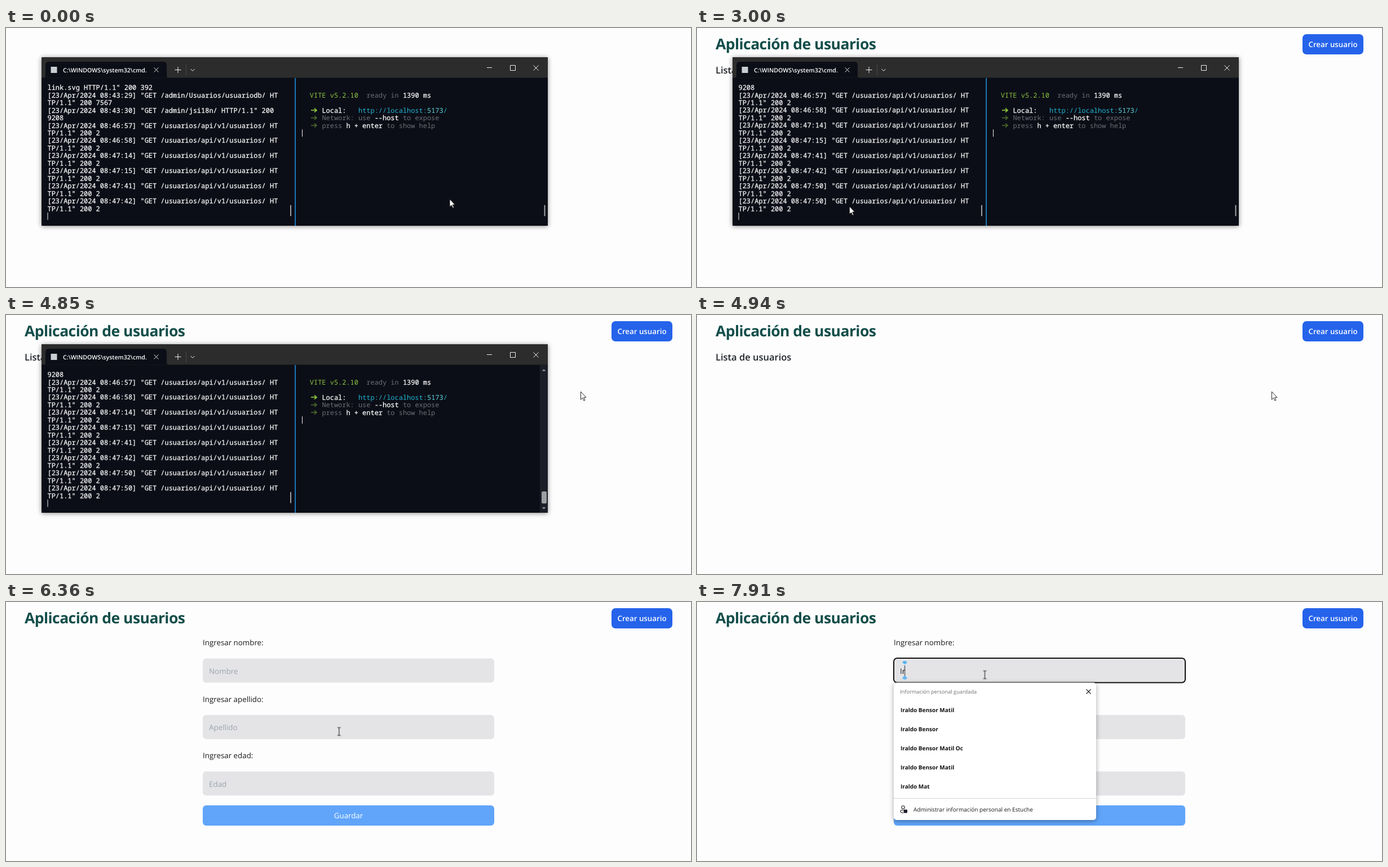
These frames come from a looping animation (1215 by 461 pixels, 8000 ms). An HTML page:

```html
<!DOCTYPE html>
<html lang="es">
<head>
<meta charset="utf-8">
<title>Aplicación de usuarios</title>
<style>
html, body { margin: 0; width: 100%; height: 100%; overflow: hidden; background: #fdfdfd; }
svg { display: block; width: 1215px; height: 461px; }
text { font-family: "Open Sans", "Noto Sans", sans-serif; white-space: pre; text-rendering: geometricPrecision; }
.mono text { font: 500 11.96px "Noto Sans Mono", "DejaVu Sans Mono", monospace; fill: #fff; stroke: #fff; stroke-width: .25px; }
.mono .dim { fill: #6c6f76; stroke: none; }
.mono .green { fill: #8bc53f; stroke: none; }
.mono .url { fill: #22b5d3; stroke: none; }
.mono .port { fill: #5fdbe3; stroke: none; }
.title { font-size: 26.5px; font-weight: 700; letter-spacing: -.54px; fill: #134e4a; }
.list { font-size: 16.5px; font-weight: 600; fill: #1f2328; }
.btn { font-size: 13.3px; font-weight: 600; fill: #fff; }
.label { font-size: 13.35px; fill: #1b1b1b; }
.hint { font-size: 13.4px; fill: #9ca3af; }
.field { fill: #e4e4e7; }
.line { fill: none; stroke: #f0f0f0; }
.names text { font-size: 10px; font-weight: 700; fill: #111; }
.shadow { filter: drop-shadow(0 1px 4px rgba(0, 0, 0, .45)); }
.popshadow { filter: drop-shadow(0 2px 4px rgba(0, 0, 0, .35)); }

/* hard switches, 1% = 80 ms */
.sw { animation: 8s step-end infinite; }
.page { animation-name: page; }
.win { animation-name: win; }
.list { animation-name: list; }
.form { animation-name: form; }
.bar { animation-name: bar; }
.thin { animation-name: thin; }
.focus { animation-name: focus; }
.empty { animation-name: empty; }
.typed { animation-name: typed; }
.second { animation-name: second; }
.caret { animation-name: caret; }
.popup { animation-name: popup; }
.log { animation-name: log; }
.new1 { animation-name: new1; }
.new2 { animation-name: new2; }
.arrow { animation-name: arrow; }
.beam { animation-name: beam; }
@keyframes page { 0% { opacity: 0 } 14%, to { opacity: 1 } }
@keyframes win { 0% { opacity: 1 } 61.75%, to { opacity: 0 } }
@keyframes list { 0% { opacity: 1 } 72.875%, to { opacity: 0 } }
@keyframes form { 0% { opacity: 0 } 72.875%, to { opacity: 1 } }
@keyframes bar { 0% { opacity: 0 } 52.875%, to { opacity: 1 } }
@keyframes thin { 0% { opacity: 1 } 52.875%, to { opacity: 0 } }
@keyframes focus { 0% { opacity: 0 } 86.75%, to { opacity: 1 } }
@keyframes empty { 0% { opacity: 1 } 94%, to { opacity: 0 } }
@keyframes typed { 0% { opacity: 0 } 94%, to { opacity: 1 } }
@keyframes second { 0% { fill: transparent } 97.75%, to { fill: #1b1b1b } }
@keyframes caret { 0% { transform: translateX(364px) } 97.75%, to { transform: translateX(368.5px) } }
@keyframes popup {
  0%, 93.25%, 96.75% { opacity: 0 }
  91.5%, 94.875%, 98.875%, to { opacity: 1 }
}
@keyframes log {
  0% { transform: none }
  18% { transform: translateY(-26.94px) }
  18.875% { transform: translateY(-40.41px) }
  19.75%, to { transform: translateY(-53.88px) }
}
@keyframes new1 { 0% { opacity: 0 } 18%, to { opacity: 1 } }
@keyframes new2 { 0% { opacity: 0 } 18.875%, to { opacity: 1 } }
@keyframes arrow { 0%, 81.875% { opacity: 1 } 74.5%, 84.375%, to { opacity: 0 } }
@keyframes beam { 0%, 81.875% { opacity: 0 } 74.5%, 84.375%, to { opacity: 1 } }

.pointer { animation: move 8s linear infinite; }
@keyframes move {
  0%, 5.5% { transform: translate(786.5px, 304px); animation-timing-function: ease-in-out }
  10.625%, 19.5% { transform: translate(687px, 231px); animation-timing-function: ease-in-out }
  24.75%, 31.875% { transform: translate(565px, 249px); animation-timing-function: ease-in }
  35.75% { transform: translate(330px, 328px) }
  37.5% { transform: translate(270px, 317px); animation-timing-function: ease-out }
  40.875%, 42.5% { transform: translate(249px, 310px) }
  44% { transform: translate(244px, 308px); animation-timing-function: ease-in-out }
  52.875%, 53.5% { transform: translate(956px, 190px); animation-timing-function: ease-out }
  60.625%, 63% { transform: translate(1019px, 136px); animation-timing-function: ease-in-out }
  68.75% { transform: translate(1100px, 31px); animation-timing-function: ease-out }
  71.25%, 74.49% { transform: translate(1104px, 42px) }
  74.5%, 76.25% { transform: translate(639px, 224px); animation-timing-function: ease-in }
  78.75% { transform: translate(600px, 240px) }
  81.875% { transform: translate(562px, 201px) }
  84.375% { transform: translate(530px, 144px); animation-timing-function: ease-out }
  86.25%, to { transform: translate(510.5px, 129.5px) }
}
</style>
</head>
<body>
<svg viewBox="0 0 1215 461">
  <defs>
    <clipPath id="pane"><rect x="63" y="100.5" width="448" height="251"/></clipPath>
    <clipPath id="tab"><rect x="95" y="60" width="154" height="28"/></clipPath>
  </defs>

  <g class="sw page">
    <text class="title" x="33" y="38">Aplicación de usuarios</text>
    <rect x="1074" y="11" width="108" height="36" rx="7" fill="#2563eb"/>
    <text class="btn" x="1128" y="34" text-anchor="middle">Crear usuario</text>
    <text class="sw list" x="33" y="80.5">Lista de usuarios</text>
  </g>

  <g class="sw form">
    <g id="fields"></g>
    <rect x="349" y="362" width="517" height="36" rx="6" fill="#60a5fa"/>
    <text class="btn" x="607.5" y="385" text-anchor="middle" style="font-weight:400">Guardar</text>
    <rect class="sw focus" x="349" y="100" width="517" height="43.5" rx="6" fill="none" stroke="#111" stroke-width="2"/>
    <g class="sw typed">
      <text class="label" x="360" y="127.5">I<tspan class="sw second">r</tspan></text>
      <g class="sw caret">
        <path d="M0 113V132" stroke="#111"/>
        <path d="M-4 108a4 3.2 0 0 1 8 0L0 111.5ZM-4 134.5a4 3.2 0 0 0 8 0L0 131Z" fill="#5cb6f2"/>
      </g>
    </g>
  </g>

  <g class="sw popup">
    <rect class="popshadow" x="349" y="143.5" width="359" height="244.5" rx="5" fill="#fff"/>
    <text x="360" y="163" font-size="9.25" fill="#707070">Información personal guardada</text>
    <path d="M690.5 155.5l8 8m0-8l-8 8" stroke="#222" stroke-width="1.1"/>
    <g class="names" id="names"></g>
    <path d="M349 349.5H708" stroke="#d4d4d4"/>
    <g fill="none" stroke="#222" stroke-width="1.1">
      <circle cx="365.5" cy="365.5" r="2.7"/>
      <path d="M366 375.5c-3 0-5-1-5-3.5q0-1.5 1.5-1.5H366"/>
    </g>
    <rect x="366.5" y="369.5" width="6.5" height="6" rx="1" fill="#1b1b2b"/>
    <text x="384" y="373" font-size="10.05" fill="#1b1b1b">Administrar información personal en Estuche</text>
  </g>

  <g class="sw win">
    <rect class="shadow" x="63" y="52" width="898" height="300" fill="#0c0e17"/>
    <path d="M63 52H961V88.5H63Z" fill="#2c2c2c"/>
    <path d="M66 88.5q4 0 4-4V66q0-6 6-6H279q6 0 6 6V84.5q0 4 4 4Z" fill="#0c0e17"/>
    <rect x="79.5" y="69" width="11" height="11" fill="#c9ced3"/>
    <g clip-path="url(#tab)">
      <text x="101" y="78.5" font-size="10.6" font-weight="600" fill="#fff">C:\WINDOWS\system32\cmd.exe</text>
    </g>
    <path class="line" d="M262.5 70.5l8 8m0-8l-8 8M299.5 74.5h11m-5.5-5.5v11M327.5 73l3.5 3.5 3.5-3.5M853 70.5h9M894.5 66.5h9v9h-9ZM935.5 66.5l9 9m0-9l-9 9"/>
    <path d="M319.5 65V84" stroke="#484848"/>
    <rect x="512.2" y="89" width="1.8" height="263" fill="#1f80c8"/>

    <g class="mono">
      <g clip-path="url(#pane)"><g class="sw log" id="log"></g></g>
      <g id="server"></g>
    </g>
    <path d="M74 328.5V341.5M525.5 180.5V193.5" stroke="#f0f0f0"/>
    <g fill="none" stroke-width="1.8" id="arrows"></g>
    <rect x="504" y="315" width="2" height="20" rx="1" fill="#a2a3a6"/>
    <rect class="sw thin" x="954.5" y="315" width="2" height="20" rx="1" fill="#a2a3a6"/>
    <g class="sw bar">
      <rect x="947" y="89" width="14" height="263" fill="#1b1e27"/>
      <rect x="950" y="314" width="9" height="21.5" rx="2" fill="#9d9ea2"/>
      <path d="M950.5 100h7l-3.5-4ZM950.5 342h7l-3.5 4Z" fill="#85878d"/>
    </g>
  </g>

  <g class="pointer">
    <path class="sw arrow" d="M.5.5V14.5L3.7 11.5 5.9 16.5 8 15.6 5.8 10.7H10Z" fill="#fff" stroke="#111" stroke-width=".9"/>
    <path class="sw beam" d="M-3-7h2q1 0 1 1V6q0 1-1 1h-2M3-7H1q-1 0-1 1M3 7H1Q0 7 0 6" fill="none" stroke="#222" stroke-width="1.1"/>
  </g>
</svg>
<script>
const $ = id => document.getElementById(id);
const ROW = 13.47, COL = 7.176, WIDTH = 57;
const baseline = row => 110.2 + row * ROW;

// server requests, wrapped at the pane width
const api = ['/usuarios/api/v1/usuarios/', 2];
const requests = [
  ['43:29', '/admin/Usuarios/usuariodb/', 7567],
  ['43:30', '/admin/jsi18n/', 9208],
  ...['46:57', '46:58', '47:14', '47:15', '47:41', '47:42', '47:50', '47:50'].map(t => [t, ...api])
];
const lines = ['link.svg HTTP/1.1" 200 392'];
for (const [time, path, size] of requests) {
  const entry = `[23/Apr/2024 08:${time}] "GET ${path} HTTP/1.1" 200 ${size}`;
  lines.push(entry.slice(0, WIDTH), entry.slice(WIDTH));
}
const freshness = i => i < 17 ? '' : i < 19 ? 'sw new1' : 'sw new2';
$('log').innerHTML = lines.map((s, i) =>
  `<text class="${freshness(i)}" x="73.5" y="${baseline(i)}">${s}</text>`).join('');

// dev server pane: row, column, class, text
$('server').innerHTML = [
  [1, 2, 'green', 'VITE v5.2.10'], [1, 16, 'dim', 'ready in'], [1, 25, '', '1390 ms'],
  [3, 5, '', 'Local:'], [3, 14, 'url', 'http://localhost:'], [3, 31, 'port', '5173'], [3, 35, 'url', '/'],
  [4, 5, 'dim', 'Network: use'], [4, 18, '', '--host'], [4, 25, 'dim', 'to expose'],
  [5, 5, 'dim', 'press'], [5, 11, '', 'h + enter'], [5, 21, 'dim', 'to show help']
].map(([r, c, k, s]) => `<text class="${k}" x="${524.5 + c * COL}" y="${baseline(r)}">${s}</text>`).join('');
$('arrows').innerHTML = [3, 4, 5].map(r =>
  `<path d="M541 ${baseline(r) - 4.2}h10m-4-3.5l4 3.5-4 3.5" stroke="${r === 3 ? '#8bc53f' : '#46632a'}"/>`).join('');

$('fields').innerHTML = ['Nombre', 'Apellido', 'Edad'].map((name, i) => {
  const y = 100.5 + i * 100.5;
  return `<text class="label" x="349" y="${y - 23.5}">Ingresar ${name.toLowerCase()}:</text>
    <rect class="field" x="349" y="${y}" width="517" height="43" rx="6"/>
    <text class="hint ${i ? '' : 'sw empty'}" x="360" y="${y + 27}">${name}</text>`;
}).join('');

$('names').innerHTML = ['Iraldo Bensor Matil', 'Iraldo Bensor', 'Iraldo Bensor Matil Oc', 'Iraldo Bensor Matil', 'Iraldo Mat']
  .map((s, i) => `<text x="361" y="${195.5 + i * 34.1}">${s}</text>`).join('');
</script>
</body>
</html>
```
